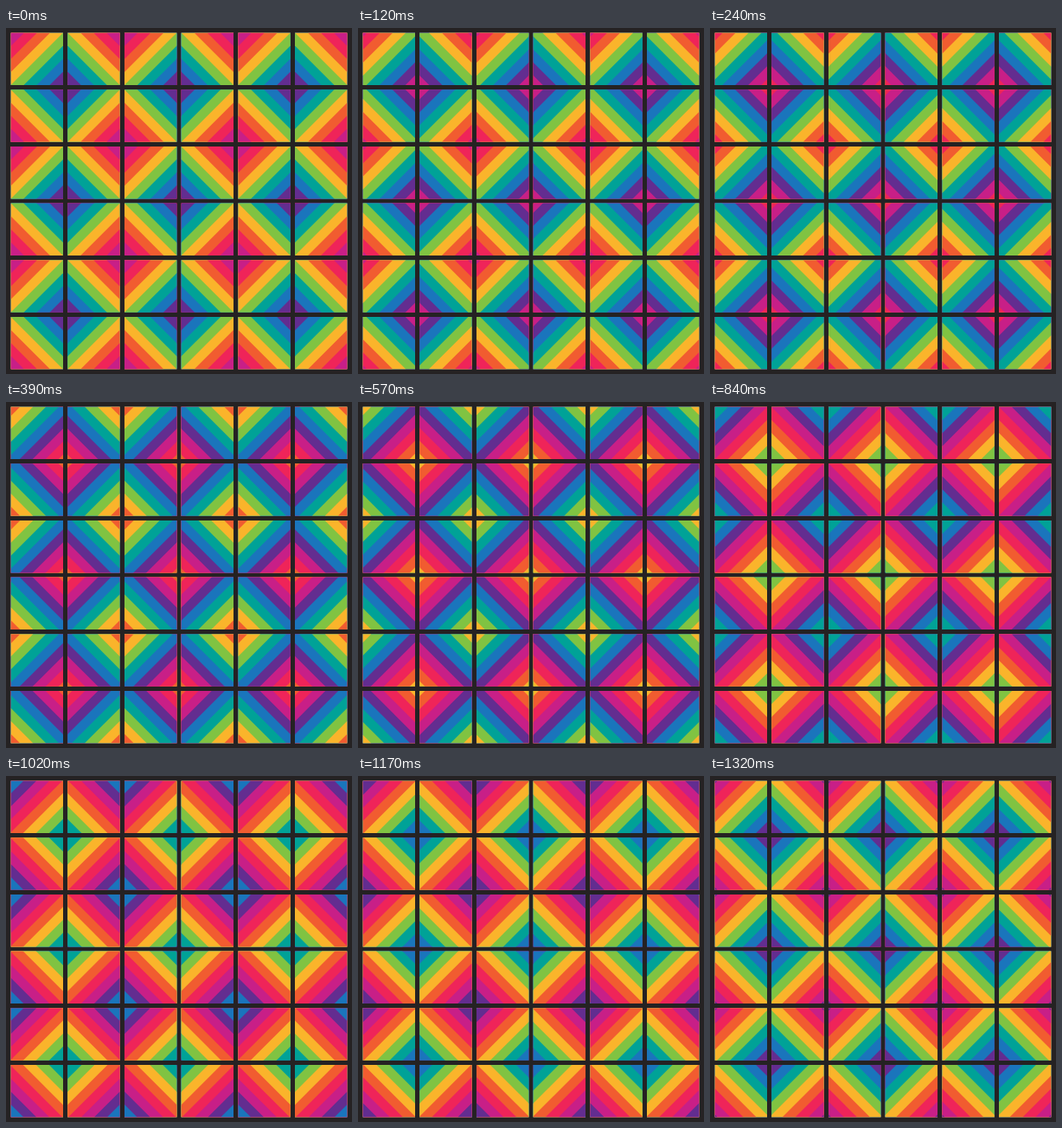
Recreate the animation shown at these times as an HTML page with a canvas. Size 400 px wide and 400 px high, loop 1.35 s.

```html
<!DOCTYPE html>
<html lang="en">
<head>
<meta charset="utf-8">
<title>Rainbow diamonds</title>
<style>
  html, body { margin: 0; width: 100%; height: 100%; overflow: hidden; background: #252223; }
  canvas { display: block; width: 400px; height: 400px; }
</style>
</head>
<body>
<canvas width="400" height="400"></canvas>
<script>
const ctx = document.querySelector('canvas').getContext('2d');
const COLORS = ['#c81f87', '#ef2459', '#f15c30', '#fab42b', '#80c342', '#00a297', '#1a75bc', '#632d90'];
const LOOP = 1350, STEP = 30;
const GRID = 6, PITCH = 65.7, INSET = 5.5, TILE = 60.5, STRIPE = 15;

// Diagonal stripes run from the tile's outer corner (0, 0) to the diamond's centre.
function drawTile(col, row, phase) {
  const flipX = col % 2, flipY = row % 2;
  ctx.save();
  ctx.translate(INSET + col * PITCH + flipX * TILE, INSET + row * PITCH + flipY * TILE);
  ctx.scale(flipX ? -1 : 1, flipY ? -1 : 1);
  ctx.beginPath();
  ctx.rect(0, 0, TILE, TILE);
  ctx.clip();
  // Nested triangles, largest first, leave one stripe of each visible.
  for (let i = Math.ceil(phase) + 9; i >= Math.floor(phase) - 1; i--) {
    const end = TILE + (i + 1 - 4 - phase) * STRIPE;
    if (end <= 0) break;
    ctx.fillStyle = COLORS[(i + 8) % 8];
    ctx.beginPath();
    ctx.moveTo(0, 0);
    ctx.lineTo(end, 0);
    ctx.lineTo(0, end);
    ctx.fill();
  }
  ctx.restore();
}

function draw() {
  const time = performance.now() % LOOP;
  const phase = Math.floor(time / STEP) * STEP / LOOP * COLORS.length;
  ctx.fillStyle = '#252223';
  ctx.fillRect(0, 0, 400, 400);
  for (let row = 0; row < GRID; row++)
    for (let col = 0; col < GRID; col++) drawTile(col, row, phase);
  requestAnimationFrame(draw);
}
draw();
</script>
</body>
</html>
```
